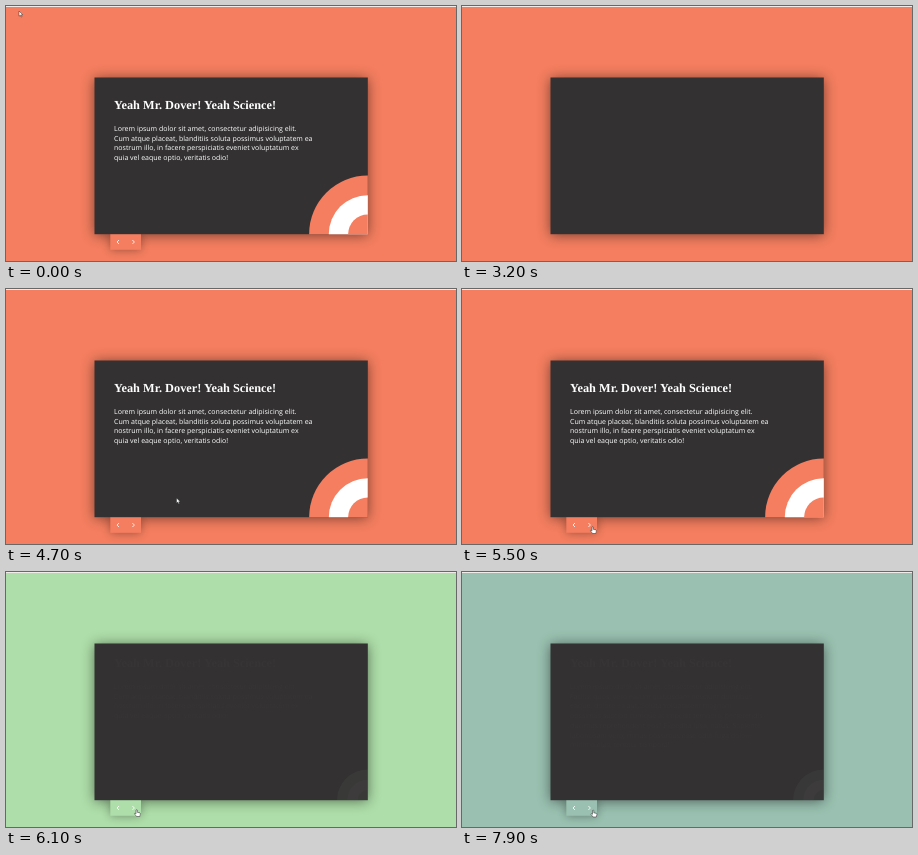
These frames come from a looping animation (450x255 px, 8 s). An HTML page:

```html
<!DOCTYPE html>
<html lang="en">
<head>
<meta charset="utf-8">
<title>Content slider</title>
<style>
html, body { margin: 0; width: 100%; height: 100%; overflow: hidden; }
svg { display: block; width: 100%; height: 100%; }
text { text-rendering: geometricPrecision; fill: #fff; }
.head { font: bold 12.3px "Liberation Serif", serif; }
.body { font: 7.03px "Open Sans", sans-serif; }
</style>
</head>
<body>
<svg viewBox="0 0 450 255">
  <defs>
    <filter id="wide" x="-20%" y="-30%" width="140%" height="160%"><feGaussianBlur stdDeviation="6.5"/></filter>
    <filter id="soft" x="-80%" y="-150%" width="260%" height="400%"><feGaussianBlur stdDeviation="5"/></filter>
    <clipPath id="card"><rect x="88.5" y="71.5" width="273.3" height="156.7"/></clipPath>
  </defs>
  <rect id="bg" width="450" height="255"/>
  <rect width="450" height="1" fill="#f1ecea"/>
  <rect x="88.5" y="72.5" width="273.3" height="156.7" opacity=".5" filter="url(#wide)"/>
  <g id="nav">
    <rect x="104.3" y="229" width="30.7" height="15" opacity=".36" filter="url(#soft)"/>
    <rect id="navFill" x="104.3" y="220" width="30.7" height="23.8"/>
    <path d="M113 234l-2 2 2 2M126.4 234l2 2-2 2" fill="none" stroke="#fff" stroke-opacity=".85"/>
  </g>
  <rect x="88.5" y="71.5" width="273.3" height="156.7" fill="#333132"/>
  <g clip-path="url(#card)">
    <g id="arc">
      <circle id="outer" r="58.7"/>
      <circle r="39" fill="#fff"/>
      <circle id="inner" r="19.7"/>
    </g>
  </g>
  <text id="head" class="head" x="108" y="103">Yeah Mr. Dover! Yeah Science!</text>
  <g id="body" class="body"></g>
  <path id="arrow" d="M0 0V5.2L1.3 4.1 2.1 6 3 5.6 2.2 3.8H3.8Z" fill="#fff" stroke="#222" stroke-width=".45"/>
  <path id="hand" d="M0 0Q.7-.7 1.3 0V2.3L4 2.9Q4.6 3.2 4.4 4L3.8 6.5H.6L-1.5 3.9Q-1.5 3.1-.8 3.2L0 3.8Z" fill="#fff" stroke="#222" stroke-width=".5"/>
</svg>
<script>
const LOOP = 8000, RELOAD = 3100, CLICKS = [5790, 7590], OUT = 400;
const COLORS = [[244, 126, 95], [174, 222, 169], [153, 192, 176]];
const TEXTS = [
  ["Lorem ipsum dolor sit amet, consectetur adipisicing elit.",
   "Cum atque placeat, blanditiis soluta possimus voluptatem ea",
   "nostrum illo, in facere perspiciatis eveniet voluptatum ex",
   "quia vel eaque optio, veritatis odio!"],
  ["Lorem ipsum dolor sit amet, consectetur adipisicing elit.",
   "Facilis, quos, vero earum quibusdam nesciunt doloribus",
   "eaque, dolore ea aut. Soluta voluptatem magnam",
   "possimus suscipit cumque at impedit tempora, perferendis",
   "ducimus reprehenderit eos? Expedita ipsa, natus. Sapiente",
   "laboriosam vero, minus possimus esse odio fuga dolore",
   "minima eius, tenetur tempora!"]
];
// Cursor stops: time, x, y
const TRACK = [
  [0, 13, 5], [550, 13, 5], [1000, 11, 21], [1150, 11, 21], [1880, 180, 124],
  [3350, 292, 118], [4000, 263.5, 150], [4700, 170.5, 209], [4850, 170.5, 209],
  [5500, 130, 238], [7550, 130, 238], [7700, 130.5, 238.5], [8000, 130.5, 238.5]
];

const el = id => document.getElementById(id);
const clamp = x => Math.min(1, Math.max(0, x));
const mix = (a, b, k) => a + (b - a) * k;
const smooth = x => x * x * (3 - 2 * x);

function elastic(ms) {
  const x = ms / 900;
  if (x <= 0) return 0;
  return x >= 1 ? 1 : 1 - 2 ** (-10 * x) * Math.cos(2 * Math.PI * x / 0.45);
}

// How far a part is shown: 0 hidden, 1 in place
function shown(t, loadAt, delay, power) {
  if (t < RELOAD) return 1;
  if (t < CLICKS[0]) return elastic(t - loadAt);
  const since = t - (t < CLICKS[1] ? CLICKS[0] : CLICKS[1]);
  return since < OUT ? (1 - since / OUT) ** power : elastic(since - OUT - delay);
}

function color(t) {
  let c = COLORS[0];
  CLICKS.forEach((at, i) => {
    const k = 1 - (1 - clamp((t - at) / 300)) ** 1.6;
    c = c.map((v, j) => mix(v, COLORS[i + 1][j], k));
  });
  return `rgb(${c.map(Math.round)})`;
}

function drop(id, p) {
  el(id).setAttribute("transform", `translate(0 ${-8 * (1 - p)})`);
  el(id).setAttribute("opacity", clamp(p));
}

let current = -1;
function setText(n) {
  if (n === current) return;
  current = n;
  el("body").innerHTML = TEXTS[n]
    .map((s, i) => `<text x="108" y="${124.9 + 9.75 * i}">${s}</text>`).join("");
}

function cursor(t) {
  let i = 0;
  while (i < TRACK.length - 2 && t >= TRACK[i + 1][0]) i++;
  const [t0, x0, y0] = TRACK[i], [t1, x1, y1] = TRACK[i + 1];
  const k = smooth(clamp((t - t0) / (t1 - t0)));
  const x = mix(x0, x1, k), y = mix(y0, y1, k);
  const visible = t < 1880 || t >= 3350;
  const over = y > 229;
  for (const [id, on] of [["arrow", !over], ["hand", over]]) {
    el(id).setAttribute("transform", `translate(${x} ${y})`);
    el(id).setAttribute("visibility", visible && on ? "visible" : "hidden");
  }
}

function draw(t) {
  const c = color(t);
  for (const id of ["bg", "navFill", "outer", "inner"]) el(id).setAttribute("fill", c);

  const p = shown(t, 3880, 0, 2);
  el("arc").setAttribute("transform", `translate(361.8 228.2) scale(${0.5 + 0.5 * p})`);
  el("arc").setAttribute("opacity", clamp(p));

  setText(t < CLICKS[0] + OUT ? 0 : 1);
  drop("head", shown(t, 3945, 50, 3));
  drop("body", shown(t, 3995, 50, 3));
  drop("nav", t < RELOAD ? 1 : elastic(t - 4060));
  cursor(t);
}

const start = performance.now();
function tick() {
  draw((performance.now() - start) % LOOP);
  requestAnimationFrame(tick);
}
tick();
</script>
</body>
</html>
```
